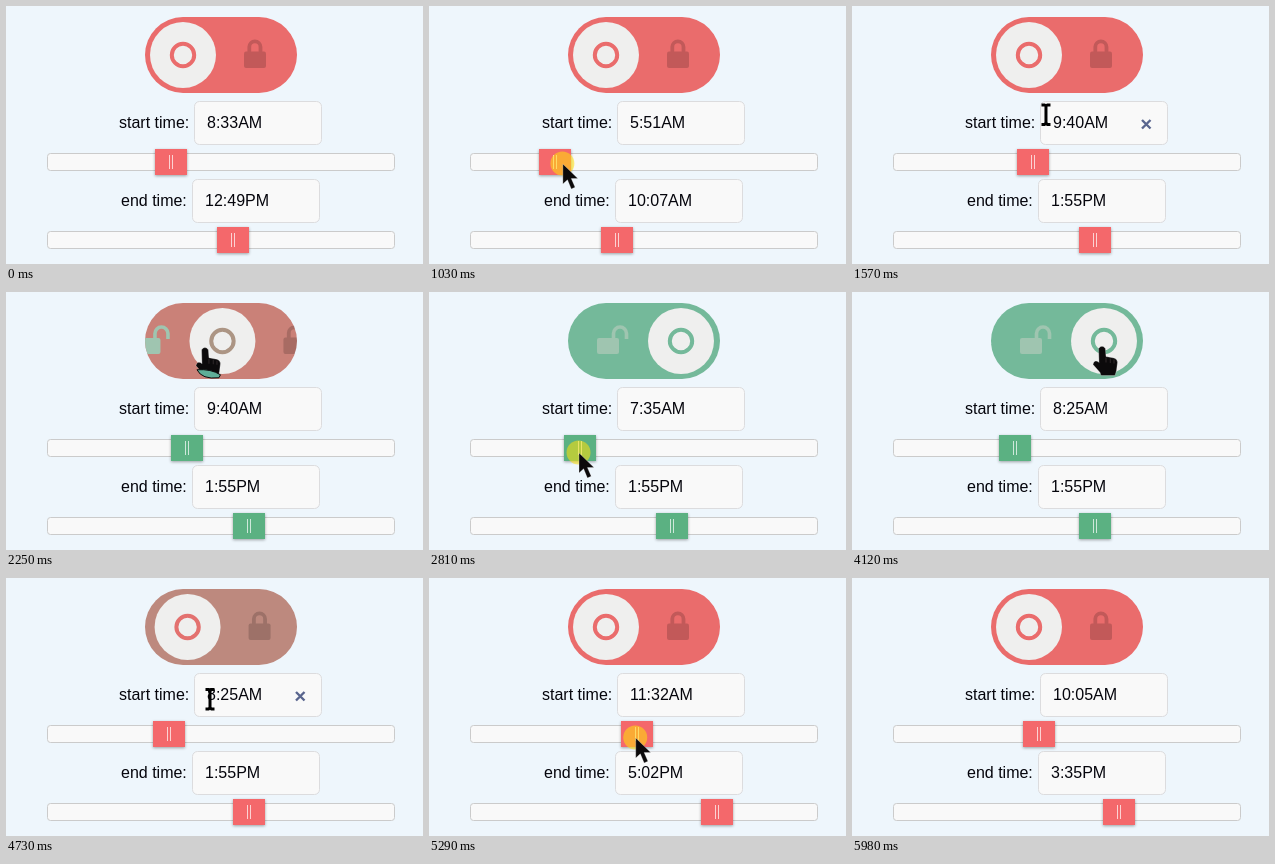
These frames come from a looping animation (417 px wide and 258 px high, 6380 ms). An HTML page:

```html
<!DOCTYPE html>
<html lang="en">
<head>
<meta charset="utf-8">
<title>Time range lock</title>
<style>
html, body { margin: 0; width: 100%; height: 100%; overflow: hidden; background: #eef6fc; }
svg { display: block; width: 100%; height: 100%; }
text { font: 16px "Liberation Sans", Arial, sans-serif; fill: #05050c; white-space: pre; }
.box { fill: #f9f9f9; stroke: #dcdcde; }
.track { fill: #f9f9f9; stroke: #cbcbcb; }
.handle { filter: drop-shadow(0 1px 1.5px rgba(0, 0, 0, .35)); }
.grip { stroke: #fff; stroke-opacity: .7; }
.cursor { fill: #0c0a0b; stroke: #fff; stroke-opacity: .45; stroke-width: .6; }
</style>
</head>
<body>
<svg viewBox="0 0 417 258">
  <defs>
    <clipPath id="pillClip"><rect x="139" y="11" width="152" height="76" rx="38"/></clipPath>
    <g id="knob">
      <rect class="handle" x="-16" y="143" width="32" height="26"/>
      <path class="grip" d="M-1.5 149v14M1.5 149v14"/>
    </g>
  </defs>
  <rect width="417" height="258" fill="#eef6fc"/>

  <rect id="pill" x="139" y="11" width="152" height="76" rx="38"/>
  <g clip-path="url(#pillClip)">
    <g id="strip">
      <path d="M109.5 47V41.5a6.5 6.5 0 0 1 13 0V47" fill="none" stroke="#9fc5b0" stroke-width="3.6"/>
      <rect x="93" y="46" width="22" height="16" rx="2" fill="#9fc5b0"/>
      <circle cx="177" cy="49" r="33" fill="#efefee"/>
      <circle id="ring" cx="177" cy="49" r="11.2" fill="none" stroke-width="4"/>
      <g opacity=".17">
        <path d="M243.3 47V41a5.6 5.6 0 0 1 11.2 0V47" fill="none" stroke="#000" stroke-width="3.8"/>
        <rect x="238" y="45.5" width="22" height="16.5" rx="2"/>
      </g>
    </g>
  </g>

  <text x="113" y="122">start time:</text>
  <rect class="box" x="188.5" y="95.5" width="127" height="43" rx="5"/>
  <text id="startText" x="201" y="122"></text>
  <path id="clear" d="M290 114l8.5 8.5M298.5 114l-8.5 8.5" stroke="#59658e" stroke-width="2.4"/>
  <rect class="track" x="41.5" y="147.5" width="347" height="17" rx="3"/>
  <use id="startHandle" href="#knob"/>

  <text x="115" y="200">end time:</text>
  <rect class="box" x="186.5" y="173.5" width="127" height="43" rx="5"/>
  <text id="endText" x="199" y="200"></text>
  <rect class="track" x="41.5" y="225.5" width="347" height="17" rx="3"/>
  <use id="endHandle" href="#knob" y="78"/>

  <g id="pointer">
    <circle id="press" r="12" cx="-.5" cy="-.5" fill="#ffe00a" fill-opacity=".55"/>
    <path id="arrow" class="cursor" d="M0 0V20L4.6 15.8L8.4 25L12.2 23.2L8.4 14.6H15Z"/>
    <g id="hand">
      <path class="cursor" d="M-3.4 1Q0 -3.4 3.4 1L4 9L12 10.5Q15.5 11.5 15.5 15L14.5 23L13 28H-1L-2 25L-9 17Q-8 12 -4 14L-3 15Z"/>
      <path d="M4 10v5M8.3 11v4.5M12 12v4" stroke="#3a3133" stroke-width=".8"/>
      <path id="cuff" d="M-8 21Q6 20 15.5 26L14 29Q-3 31 -8 21Z" fill="#5fae98" stroke="#0c0a0b"/>
    </g>
    <path id="beam" d="M-4.5 -9.5H-1.5L0 -8.3L1.5 -9.5H4.5M-4.5 10H-1.5L0 8.8L1.5 10H4.5M0 -8.5V9" fill="none" stroke="#000" stroke-width="3"/>
  </g>
</svg>
<script>
const LOOP = 6380, ENTER = 130, LEAVE = 5980;
const FRAME = 68.8;
const FADE = 400, UNLOCK = 2155, LOCK = 4492;
const RED = [234, 108, 108], GREEN = [116, 185, 154];

// Each drag arrives, presses, then swings through [time, start minute]
const drags = [
  { dx: 7.5, y: 158, arrive: 410, swings: [[560, 513], [903, 255], [1240, 580]] },
  { dx: -1.5, y: 161, arrive: 2530, swings: [[2560, 580], [3049, 343], [3290, 713], [3710, 505]] },
  { dx: -2, y: 160, arrive: 5080, swings: [[5100, 505], [5430, 810], [5770, 605]] }
];

// Other places the pointer visits: [from, to, x, y]
const visits = [
  [ENTER, ENTER, 329, 236], [1920, 2255, 199, 56.5], [4120, 4390, 250, 55.5],
  [4740, 4740, 204, 121], [LEAVE, LEAVE, 280, 280]
];

const $ = id => document.getElementById(id);
const clamp = v => Math.max(0, Math.min(1, v));
const lerp = (a, b, p) => a + (b - a) * p;
const mix = p => `rgb(${RED.map((c, i) => Math.round(lerp(c, GREEN[i], p)))})`;
const show = (id, on) => $(id).setAttribute("visibility", on ? "inherit" : "hidden");
const move = (id, x, y = 0) => $(id).setAttribute("transform", `translate(${x.toFixed(2)} ${y.toFixed(2)})`);
const xOf = min => 41.5 + min * 0.2417;

const minuteKeys = drags.flatMap(d => d.swings);
const pointKeys = [
  ...visits.flatMap(([from, to, x, y]) => [[from, x, y], [to, x, y]]),
  ...drags.flatMap(({ dx, y, arrive, swings }) =>
    [[arrive, swings[0][1]], ...swings].map(([t, min]) => [t, xOf(min) + dx, y]))
].sort((a, b) => a[0] - b[0]);

function along(keys, t, col = 1) {
  const i = keys.findIndex(k => k[0] > t);
  if (i === 0) return keys[0][col];
  if (i < 0) return keys[keys.length - 1][col];
  const a = keys[i - 1], b = keys[i];
  const p = (t - a[0]) / (b[0] - a[0]);
  return lerp(a[col], b[col], p * p * (3 - 2 * p));
}

function snap(t) {
  return ENTER + FRAME * Math.floor((t - ENTER + 14) / FRAME);
}

function clock(min) {
  min = Math.round(min);
  const h = Math.floor(min / 60), m = String(min % 60).padStart(2, "0");
  return `${h % 12 || 12}:${m}${h < 12 ? "AM" : "PM"}`;
}

// Locked: both ends move together. Unlocked: the end stays.
function endMinutes(t, start) {
  if (t < 1240) return start + 256;
  return t < LOCK ? 835 : start + 330;
}

function drawToggle(t) {
  const locking = t >= LOCK;
  const p = clamp((t - (locking ? LOCK : UNLOCK)) / FADE);
  const eased = 1 - (1 - clamp(p / 0.776)) ** 1.75;
  const slide = locking ? 1 - eased : eased;
  move("strip", slide * 75);
  $("pill").setAttribute("fill", mix(locking ? 1 - p : p));
  $("ring").setAttribute("stroke", mix(slide));
}

function drawSliders(t, start) {
  const color = t >= UNLOCK && t < LOCK ? "#5bb182" : "#f4686b";
  for (const [name, min] of [["start", start], ["end", endMinutes(t, start)]]) {
    $(name + "Text").textContent = clock(min);
    move(name + "Handle", Math.floor(xOf(min)));
    $(name + "Handle").setAttribute("fill", color);
  }
}

function drawPointer(t) {
  const x = along(pointKeys, t), y = along(pointKeys, t, 2);
  const on = t >= ENTER && t < LEAVE - FRAME / 2;
  const inField = on && x > 188 && x < 316 && y > 95 && y < 139;
  const onPill = y < 87;
  move("pointer", x, y);
  show("pointer", on);
  show("press", drags.some(({ swings }) => t > swings[0][0] && t < swings.at(-1)[0]));
  show("hand", onPill);
  show("cuff", t >= UNLOCK && t < UNLOCK + FADE / 2);
  show("beam", inField);
  show("arrow", !onPill && !inField);
  show("clear", inField);
  if (!onPill) show("cuff", false);
}

function draw(now) {
  const t = snap(now % LOOP);
  const start = along(minuteKeys, t);
  drawToggle(t);
  drawSliders(t, start);
  drawPointer(t);
}

let origin;
function tick(now) {
  origin ??= now;
  draw(now - origin);
  requestAnimationFrame(tick);
}
draw(0);
requestAnimationFrame(tick);
</script>
</body>
</html>
```
